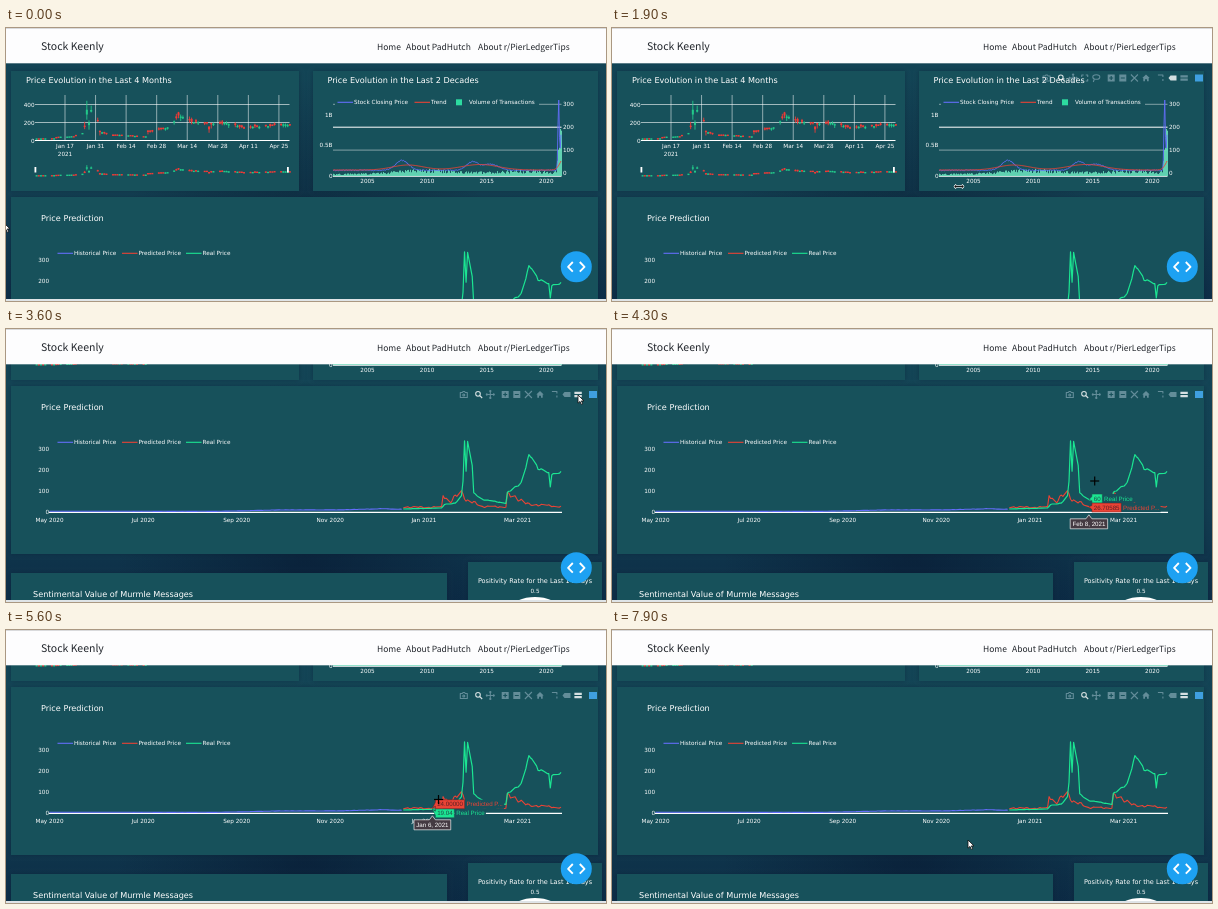
Write an HTML page with a canvas that moves like this. It is 600 px wide and 273 px high and loops after 8 s.

```html
<!DOCTYPE html>
<html lang="en">
<head>
<meta charset="utf-8">
<title>Stock dashboard</title>
<style>
html, body { margin: 0; width: 100%; height: 100%; overflow: hidden; background: #0f3448; }
canvas { display: block; width: 600px; height: 273px; }
</style>
</head>
<body>
<canvas id="stage" width="600" height="273"></canvas>
<script>
const ctx = document.getElementById('stage').getContext('2d');
const W = 600, H = 273, LOOP = 8000, STEP = 100, SCROLL = 112;
const SANS = '"DejaVu Sans", Verdana, sans-serif';
const ARIAL = '"Liberation Sans", Arial, sans-serif';
const HEAD = '"Noto Sans CJK JP", "Noto Sans CJK", "Open Sans", sans-serif';
const PURPLE = '#636efa', RED = '#ea4335', GREEN = '#1be592', PANEL = '#17515b';
const TITLE = 8.13, TICK = 5.7, TIP = 6.2;

// Page areas: x, y, width, height
const PANELS = {
  left: [5, 43, 288, 120],
  right: [307, 43, 285, 120],
  predict: [5, 169, 587, 168],
  mood: [5, 356, 436, 160],
  rate: [462, 345, 134, 160]
};
const PLOTS = { left: [29, 67, 254, 46], right: [327, 67, 229, 81], predict: [43, 217, 513, 79] };
const RIGHT_AXIS = [327, 149, 229, 11];
const within = (x, y, [px, py, w, h]) => x >= px && x <= px + w && y >= py && y <= py + h;

// Maths
const smooth = k => k * k * (3 - 2 * k);
const clamp01 = k => Math.min(1, Math.max(0, k));
const noise = n => { const s = Math.sin(n * 127.1 + 3.7) * 43758.5453; return s - Math.floor(s); };
const bump = (x, mid, width, height) => height * Math.exp(-(((x - mid) / width) ** 2));
function at(points, x, ease = k => k) {
  let i = 1;
  while (i < points.length - 1 && points[i][0] < x) i++;
  const a = points[i - 1], b = points[i];
  const k = ease(clamp01((x - a[0]) / (b[0] - a[0])));
  return a.slice(1).map((v, j) => v + (b[j + 1] - v) * k);
}

// Prices by day, counted from Friday 1 May 2020
const LAST_HISTORY = 230, FIRST = 231, LAST = 334;
const HISTORY = [[0, 5], [110, 4.5], [150, 11], [190, 11.5], [217, 16.9], [230, 14]];
const REAL = [[231, 16], [256, 20], [258, 38], [265, 43], [269, 77], [270, 148], [271, 347.5], [272, 193.6],
  [273, 325], [276, 225], [277, 90], [283, 60], [298, 43], [299, 92], [308, 138], [313, 265], [315, 264],
  [319, 208], [326, 182], [327, 120], [328, 183], [334, 190], [343, 140], [364, 175]];
const FORECAST = [[231, 24], [256, 24], [257, 85], [261, 43], [267, 92], [270, 90], [272, 52.9361], [278, 45],
  [283, 26.70585], [298, 26], [299, 85], [313, 38], [334, 27]];
const isTrading = d => (d + 5) % 7 % 6 !== 0;
const lively = (points, amount) => d =>
  at(points, d)[0] * (1 + amount * Math.sin((d - 272) * Math.PI * 5 / 11));
const history = lively(HISTORY, 0.04), real = lively(REAL, 0.03), forecast = lively(FORECAST, 0.14);

// Drawing helpers
function text(s, x, y, size, color = '#fff', align = 'left', font = SANS) {
  ctx.font = size + 'px ' + font;
  ctx.textAlign = align;
  ctx.fillStyle = color;
  ctx.fillText(s, x, y + size * 0.36);
}
function textWidth(s, size, font) {
  ctx.font = size + 'px ' + font;
  return ctx.measureText(s).width;
}
function rect(x, y, w, h, color) {
  ctx.fillStyle = color;
  ctx.fillRect(x, y, w, h);
}
function line(points, color, width = 1) {
  ctx.beginPath();
  points.forEach(p => ctx.lineTo(p[0], p[1]));
  ctx.strokeStyle = color;
  ctx.lineWidth = width;
  ctx.stroke();
}
function shape(points, fill, stroke, width) {
  ctx.beginPath();
  points.forEach(p => ctx.lineTo(p[0], p[1]));
  ctx.closePath();
  ctx.fillStyle = fill;
  ctx.fill();
  ctx.strokeStyle = stroke;
  ctx.lineWidth = width;
  ctx.stroke();
}
function disc(x, y, r, color) {
  ctx.beginPath();
  ctx.arc(x, y, r, 0, 7);
  ctx.fillStyle = color;
  ctx.fill();
}
function curve(fn, from, to, step = 0.75) {
  const out = [];
  for (let x = from; x <= to; x += step) out.push([x, fn(x)]);
  return out;
}
function panel([x, y, w, h]) {
  ctx.save();
  ctx.shadowColor = 'rgba(8,26,46,.35)';
  ctx.shadowBlur = 4;
  rect(x, y, w, h, PANEL);
  ctx.restore();
}
function legend(x, y, color, label) {
  line([[x, y], [x + 15.5, y]], color, 1.1);
  text(label, x + 16.5, y, TICK);
}

// Four-month candlesticks and their range slider
function candles(y0, scale) {
  for (let d = 248; d <= 364; d++) {
    if (!isTrading(d)) continue;
    const close = real(d), swing = Math.abs(close - real(d - 1));
    const open = close + (noise(d) - 0.35) * (swing * 0.5 + close * 0.22);
    const top = Math.max(open, close), low = Math.min(open, close);
    const reach = swing * 0.5 + close * 0.12;
    const x = 59 + (d - 261) * 2.183;
    const color = close > open ? '#22c98a' : '#f03a36';
    line([[x, y0 - (top + reach * noise(d + 9)) * scale], [x, y0 - (low - reach * noise(d + 5)) * scale]], color, 0.9);
    rect(x - 1, y0 - top * scale - 0.4, 2, Math.max(1.4, (top - low) * scale), color);
  }
}
function leftChart() {
  const grid = 'rgba(255,255,255,.75)';
  text('Price Evolution in the Last 4 Months', 20, 51.8, TITLE);
  ['Jan 17', 'Jan 31', 'Feb 14', 'Feb 28', 'Mar 14', 'Mar 28', 'Apr 11', 'Apr 25'].forEach((s, i) => {
    const x = 59 + i * 30.56;
    line([[x, 67], [x, 113]], grid, 0.7);
    text(s, x, 117.8, TICK, '#fff', 'center');
  });
  text('2021', 59, 125.8, TICK, '#fff', 'center');
  for (let v = 0; v <= 400; v += 200) {
    const y = 112.5 - v * 0.09;
    line([[29, y], [283.5, y]], v ? grid : '#fff', v ? 0.8 : 1.1);
    text(v, 28.5, y, TICK, '#fff', 'right');
  }
  candles(112.5, 0.09);
  candles(148, 0.0245);
  for (const x of [28.5, 281]) rect(x, 139, 1.8, 5.5, '#fff');
}

// Twenty-year chart
const stockY = x => 142.3 - bump(x, 396, 9, 10) - bump(x, 466, 8, 8) - bump(x, 484, 12, 6)
  - bump(x, 552.6, 0.9, 71) - bump(x, 555.5, 1.5, 40) + (noise(x) - 0.5);
const trendY = x => 142 - bump(x, 402, 22, 5) - bump(x, 474, 26, 5.5) - bump(x, 559, 6, 14);
const volume = x => 2 + bump(x, 420, 45, 4) + bump(x, 520, 40, 3.5) + bump(x, 553.8, 2.4, 50);

function rightChart() {
  text('Price Evolution in the Last 2 Decades', 321.5, 51.8, TITLE);
  for (let v = 0; v <= 300; v += 100) {
    const y = 145 - v * 0.229, main = v === 200;
    if (v) line([[327, y], [555.5, y]], main ? '#fff' : 'rgba(255,255,255,.65)', main ? 1 : 0.7);
    text(v, 557, y, TICK);
  }
  ['0', '0.5B', '1B'].forEach((s, i) => text(s, 326.5, 147.8 - i * 30.4, TICK, '#fff', 'right'));
  line([[327, 148.2], [555.5, 148.2]], '#fff', 1.1);
  for (let x = 327; x < 555.5; x++) {
    const h = volume(x) * (0.45 + 0.75 * noise(x));
    rect(x, 148 - h, 0.9, h, '#69e0bb');
  }
  line(curve(stockY, 327, 555.5), PURPLE, 0.9);
  line(curve(trendY, 327, 555.5), RED, 0.9);
  rect(329, 69, 204, 10.5, PANEL);
  legend(331.5, 74.3, PURPLE, 'Stock Closing Price');
  legend(408.5, 74.3, RED, 'Trend');
  rect(450, 71.3, 6, 6, '#2ddba0');
  text('Volume of Transactions', 463, 74.3, TICK);
  for (let i = 0; i < 4; i++) text(2005 + i * 5, 361.5 + i * 59.6, 153.2, TICK, '#fff', 'center');
}

// Prediction chart
const BASE = 295.3;
const dayX = d => 43.5 + 1.5315 * d;
const valueY = v => BASE - v * 0.212;
const series = (fn, from, to) => curve(fn, from, to, 1)
  .filter(([d]) => isTrading(d)).map(([d, v]) => [dayX(d), valueY(v)]);

function predictChart() {
  text('Price Prediction', 35, 190.3, TITLE);
  legend(51.5, 225.3, PURPLE, 'Historical Price');
  legend(116, 225.3, RED, 'Predicted Price');
  legend(180, 225.3, GREEN, 'Real Price');
  for (let v = 0; v <= 300; v += 100) text(v, 43, valueY(v), TICK, '#fff', 'right');
  line([[43, BASE], [556, BASE]], '#fff', 1.2);
  line(series(history, 0, LAST_HISTORY), PURPLE, 1.1);
  line(series(forecast, FIRST, LAST), RED, 1.1);
  line(series(real, FIRST, LAST), GREEN, 1.2);
  ['May 2020', 'Jul 2020', 'Sep 2020', 'Nov 2020', 'Jan 2021', 'Mar 2021']
    .forEach((s, i) => text(s, 43.5 + i * 93.6, 303.2, TICK, '#fff', 'center'));
}
function lowerPanels() {
  text('Sentimental Value of Murmle Messages', 27, 377.3, TITLE);
  text('Positivity Rate for the Last 14 Days', 529, 364, 6.5, '#fff', 'center');
  text('0.5', 529, 373.5, TICK, '#fff', 'center');
  disc(529, 425, 45, '#fff');
}

// Chart toolbar
const ICONS = {
  camera: 'M-3.5-2h2l.7-1h1.6l.7 1h2v5h-7zM-1 .5a1 1 0 1 0 2 0a1 1 0 1 0-2 0',
  zoom: 'M-3-.7a2.3 2.3 0 1 0 4.6 0a2.3 2.3 0 1 0-4.6 0M1 1l2.5 2.5',
  pan: 'M-4 0h8M0-4v8M-1-3l1-1l1 1M-1 3l1 1l1-1M-3-1l-1 1l1 1M3-1l1 1l-1 1',
  box: 'M-3-1v-2h2M1-3h2v2M3 1v2h-2M-1 3h-2v-2',
  lasso: 'M-3.5-1a3.5 2.3 0 1 0 7 0a3.5 2.3 0 1 0-7 0M-2 1l-1 3',
  plus: 'M-3.5-3.5h7v7h-7zM-.6-2v1.4h-1.4v1.2h1.4v1.4h1.2v-1.4h1.4v-1.2h-1.4v-1.4z',
  minus: 'M-3.5-3.5h7v7h-7zM-2-.6h4v1.2h-4z',
  auto: 'M-3.5-3.5l7 7M3.5-3.5l-7 7',
  home: 'M-3.7 0L0-3.5L3.7 0h-1v3.2h-1.7v-2h-2v2h-1.7v-3.2z',
  spike: 'M-3-3h5v2M2 1v2',
  closest: 'M-4 0l2-2.4h6v4.8h-6z',
  compare: 'M-3.7-2.8h7.4v2.2h-7.4zM-3.7.6h7.4v2.2h-7.4z'
};
const FILLED = ['plus', 'minus', 'home', 'closest', 'compare'];
const TAIL = [['plus', 'minus', 'auto', 'home'], ['spike', 'closest', 'compare']];
const SHORT = [['camera'], ['zoom', 'pan'], ...TAIL];
const FULL = [['camera'], ['zoom', 'pan', 'box', 'lasso'], ...TAIL];
const BARS = { left: [282, 50, SHORT], right: [587, 50, FULL], predict: [587, 177.5, SHORT] };

function icon(key, x, y, on) {
  const path = new Path2D(ICONS[key]);
  ctx.save();
  ctx.translate(x, y);
  ctx.fillStyle = ctx.strokeStyle = on ? 'rgba(255,255,255,.82)' : 'rgba(205,225,240,.42)';
  ctx.lineWidth = 1.1;
  if (FILLED.includes(key)) ctx.fill(path, 'evenodd');
  else ctx.stroke(path);
  ctx.restore();
}
function toolbar([right, y, groups], mode) {
  rect(right - 4, y - 3.5, 8, 7, '#3f9fe0');
  let x = right;
  for (const group of [...groups].reverse()) {
    x -= 3.3;
    for (const key of [...group].reverse()) icon(key, x -= 11.6, y, key === 'zoom' || key === mode);
  }
}

// Hover labels
function tag(x, anchorY, y, value, name, color, ink) {
  const edge = x + 6.5 + textWidth(value, TIP, ARIAL);
  rect(edge, y - 4.6, textWidth(name, TIP, ARIAL) + 3, 9.2, PANEL);
  shape([[x, anchorY], [x + 3, y - 2], [x + 3, y - 4.5], [edge, y - 4.5], [edge, y + 4.5], [x + 3, y + 4.5], [x + 3, y + 2]],
    color, ink, 0.5);
  text(value, x + 4.8, y, TIP, ink, 'left', ARIAL);
  text(name, edge + 1.8, y, TIP, color, 'left', ARIAL);
}
function dateTag(x, d) {
  const s = new Date(Date.UTC(2020, 4, 1 + d))
    .toLocaleDateString('en-US', { month: 'short', day: 'numeric', year: 'numeric', timeZone: 'UTC' });
  const w = textWidth(s, TIP, ARIAL) / 2 + 2.2, y = BASE + 6.5;
  shape([[x, y - 4], [x + 3, y], [x + w, y], [x + w, y + 10], [x - w, y + 10], [x - w, y], [x - 3, y]],
    '#443a42', '#f0eeee', 0.7);
  text(s, x, y + 5.1, TIP, '#fff', 'center', ARIAL);
}
function hover(cx) {
  let d = Math.min(LAST, Math.max(0, Math.floor((cx - 48.5) / 1.5315)));
  while (!isTrading(d)) d--;
  const x = dayX(d);
  if (d <= LAST_HISTORY) {
    const y = valueY(history(d));
    tag(x, y, y, +history(d).toFixed(2), 'Historical P...', PURPLE, '#fff');
  } else {
    const ya = valueY(real(d)), yb = valueY(forecast(d));
    const push = Math.max(0, 9 - Math.abs(ya - yb)) / 2 * (ya <= yb ? 1 : -1);
    tag(x, ya, ya - push, +real(d).toFixed(2), 'Real Price', GREEN, '#1d4a48');
    tag(x, yb, yb + push, forecast(d).toFixed(5), 'Predicted P...', RED, '#5a1f24');
  }
  dateTag(x, d);
}

// Pointer: time, x, y
const PATH = [[0, -2, 195], [500, 2, 167], [900, 20, 140], [1400, 240, 122], [1900, 347, 158.5], [2100, 347, 158.5],
  [2600, 327, 173], [3450, 572, 66], [3750, 572, 66], [4300, 482.7, 152], [5000, 465.6, 162], [6400, 381.5, 181],
  [7200, 335, 196], [7900, 356, 210]];
const ARROW = [[0, 0], [0, 8.2], [2, 6.4], [3.3, 9.4], [4.7, 8.8], [3.4, 5.9], [6, 5.9]];

function pointer(x, y, pageY) {
  if (Object.values(PLOTS).some(p => within(x, pageY, p))) {
    line([[x - 4.5, y], [x + 4.5, y]], '#000', 1.2);
    line([[x, y - 4.5], [x, y + 4.5]], '#000', 1.2);
  } else if (within(x, pageY, RIGHT_AXIS)) {
    for (const [color, width] of [['#fff', 2.2], ['#000', 0.9]]) {
      line([[x - 4, y], [x + 4, y]], color, width);
      for (const s of [-1, 1]) line([[x + s * 2.6, y - 1.6], [x + s * 4.2, y], [x + s * 2.6, y + 1.6]], color, width);
    }
  } else {
    shape(ARROW.map(([dx, dy]) => [x + dx, y + dy]), '#fff', '#111', 0.8);
  }
}

function backdrop() {
  const g = ctx.createLinearGradient(0, 36, 0, H);
  g.addColorStop(0, '#124455');
  g.addColorStop(0.6, '#113c50');
  g.addColorStop(1, '#0c2c46');
  rect(0, 0, W, H, g);
  const dark = ctx.createRadialGradient(300, 240, 10, 300, 240, 190);
  dark.addColorStop(0, 'rgba(5,16,42,.45)');
  dark.addColorStop(1, 'rgba(5,16,42,0)');
  rect(0, 35, W, H, dark);
}
function header() {
  const ink = '#23272d';
  rect(0, 0, W, 35.3, '#fdfdfe');
  rect(0, 0, W, 1, '#d9dadc');
  text('Stock Keenly', 35, 18.5, 10.5, ink, 'left', HEAD);
  text('Home', 371, 18.5, 8.5, ink, 'left', HEAD);
  text('About PadHutch', 400, 18.5, 8.5, ink, 'left', HEAD);
  text('About r/PierLedgerTips', 472, 18.5, 8.5, ink, 'left', HEAD);
}
function codeButton(x, y) {
  disc(x, y, 15.5, '#1da1f2');
  for (const s of [-1, 1]) line([[x + s * 3.5, y - 4.8], [x + s * 8.2, y], [x + s * 3.5, y + 4.8]], '#fff', 1.9);
}

function draw(t) {
  const scroll = SCROLL * smooth(clamp01((t - 2000) / 500));
  const [cx, cy] = at(PATH, t, smooth);
  const pageY = cy + scroll;
  const mode = t >= 3600 ? 'compare' : 'closest';

  backdrop();
  ctx.save();
  ctx.translate(0, -scroll);
  Object.values(PANELS).forEach(panel);
  leftChart();
  rightChart();
  predictChart();
  lowerPanels();
  for (const name in BARS) if (within(cx, pageY, PANELS[name])) toolbar(BARS[name], mode);
  if (mode === 'compare' && within(cx, pageY, PLOTS.predict)) hover(cx);
  ctx.restore();

  header();
  codeButton(570.3, 238.8);
  rect(0, 271, W, 2, '#dfe4e7');
  pointer(cx, cy, pageY);
}

ctx.textRendering = 'geometricPrecision';
ctx.lineJoin = 'round';
function frame() {
  const t = performance.now() % LOOP;
  draw(Math.floor(t / STEP) * STEP);
  requestAnimationFrame(frame);
}
frame();
</script>
</body>
</html>
```
